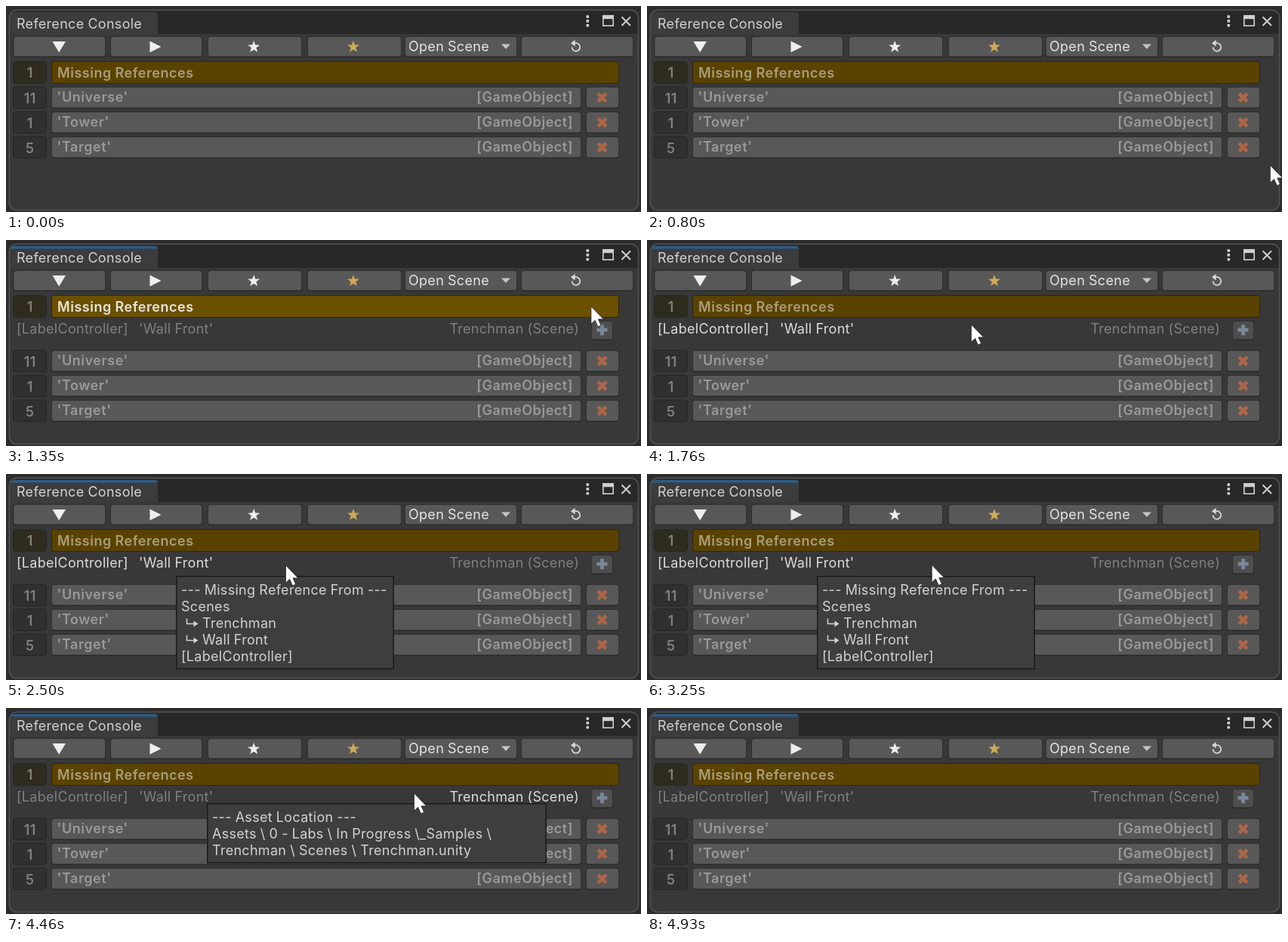
These frames come from a looping animation (841 by 273 pixels, 5600 ms). An HTML page:

```html
<!DOCTYPE html>
<html lang="en">
<head>
<meta charset="utf-8">
<title>Reference Console</title>
<style>
  html, body { margin: 0; width: 100%; height: 100%; overflow: hidden; background: #333; }
  svg { display: block; }
  text { font: 400 18px Inter, "Open Sans", sans-serif; letter-spacing: .29px; word-spacing: -.4px; white-space: pre; }
  .b { font-weight: 600; letter-spacing: .54px; }
</style>
</head>
<body>
<svg id="stage" width="841" height="273" viewBox="0 0 841 273"></svg>
<script>
const LOOP = 5600;
const svg = document.getElementById('stage');

// ---- drawing helpers ----
const text = (x, y, s, fill, extra = '') => `<text x="${x}" y="${y}" fill="${fill}" ${extra}>${s}</text>`;
const rect = (x, y, w, h, fill, extra = '') =>
  `<rect x="${x}" y="${y}" width="${w}" height="${h}" fill="${fill}" ${extra}/>`;
const path = (d, fill, extra = '') => `<path d="${d}" fill="${fill}" ${extra}/>`;
const button = (x, y, w, h, fill = '#585858') =>
  rect(x, y, w, h, '#282828', 'rx="4"') + rect(x, y, w, h - 1.2, '#303030', 'rx="4"') +
  rect(x + 1, y + 1, w - 2, h - 2.4, fill, 'rx="3.2"');
const counter = (y, n, fill, color) =>
  rect(9.5, y + .5, 44, 28.5, fill, 'rx="4" stroke="#252525"') +
  text(31.8, y + 22, n, color, 'class="b" text-anchor="middle"');

function star(cx, cy, r, fill) {
  let d = '';
  for (let i = 0; i < 10; i++) {
    const a = i * Math.PI / 5, q = i % 2 ? r * .4 : r;
    d += (i ? 'L' : 'M') + (cx + q * Math.sin(a)).toFixed(2) + ' ' + (cy - q * Math.cos(a)).toFixed(2);
  }
  return path(d + 'Z', fill);
}

const plus = (cx, cy, r, color, turn = 0) =>
  path(`M${-r} 0H${r}M0 ${-r}V${r}`, 'none',
    `stroke="${color}" stroke-width="4.8" transform="translate(${cx} ${cy}) rotate(${turn})"`);

function row(y, n, name) {
  return counter(y - .4, n, '#303030', '#808080') +
    button(60, y, 702, 29) +
    text(67.6, y + 20, `'${name}'`, '#999', 'class="b"') +
    text(751, y + 20, '[GameObject]', '#999', 'class="b" text-anchor="end"') +
    button(768, y, 44, 29) + plus(789.5, y + 14.2, 7.6, '#ac6648', 45);
}

function toolbar() {
  const spans = [[9.5, 122.5], [138, 122], [267, 125], [399, 125], [528, 149], [682, 149]];
  return spans.map(([x, w]) => button(x, 40, w, 28)).join('') +
    path('M61.5 47H79L70.2 61.5Z', '#eee') +
    path('M190.5 46.5V61.5L205.5 54Z', '#eee') +
    star(328.2, 54.3, 8.4, '#eee') + star(460, 54.3, 8.4, '#d0aa55') +
    text(533, 60, 'Open Scene', '#e4e4e4') +
    path('M656 50.5H668L662 57Z', '#c4c4c4') +
    path('M750.5 49.2H755A5.3 5.3 0 1 1 749.6 54.6', 'none', 'stroke="#d8d8d8" stroke-width="1.8"') +
    path('M748 49.2L753.6 45V53.4Z', '#d8d8d8');
}

function frame() {
  return rect(0, 0, 841, 273, '#2c2c2c') +
    rect(4.5, 5.5, 833, 265, '#383838', 'rx="10"') +
    path('M5 37V15Q5 6 14 6H828Q837 6 837 15V37Z', '#282828') +
    path('M5 38V14Q5 8 11 8H197Q201 8 201 12V38Z', '#3c3c3c') +
    path('M5.5 11.5Q6.5 8 11 8H197Q200.5 8 201 11.5Z', '#2c5d87', 'id="focus"') +
    rect(4.3, 5.3, 833.2, 265.2, 'none', 'rx="10" stroke="#505050" stroke-width="1.7"') +
    text(14, 30, 'Reference Console', '#d2d2d2') +
    [14, 19.8, 25.6].map(y => rect(768.5, y - 1.7, 3.6, 3.6, '#d0d0d0', 'rx=".8"')).join('') +
    rect(790.8, 13, 13.4, 13.2, 'none', 'stroke="#d0d0d0" stroke-width="1.6"') +
    rect(790, 12.2, 15, 5, '#d0d0d0') +
    path('M815.5 14.5L827 26M827 14.5L815.5 26', 'none', 'stroke="#d0d0d0" stroke-width="2"');
}

const elbow = (x, y) =>
  path(`M${x} ${y - 7}V${y}H${x + 10}`, 'none', 'stroke="#d2d2d2" stroke-width="1.5"') +
  path(`M${x + 9} ${y - 4}L${x + 15} ${y}L${x + 9} ${y + 4}Z`, '#d2d2d2');

// Each line is [x, content]; lines sit 22 px apart.
const tip = (id, x, y, w, h, first, lines) =>
  `<g id="${id}">` + rect(x + .75, y + .75, w - 1.5, h - 1.5, '#3e3e3e', 'stroke="#1b1b1b" stroke-width="1.5"') +
  lines.map(([tx, s], i) => text(tx, first + i * 22, s, '#d2d2d2')).join('') + '</g>';

svg.innerHTML = frame() + toolbar() +
  counter(73.4, 1, '#2f2b1d', '#858170') +
  rect(60, 73, 752, 30, '#30270c', 'rx="4"') +
  rect(61, 74, 750, 28, '#5a4300', 'rx="3.2" id="head"') +
  text(68, 95, 'Missing References', '#aa9c78', 'class="b" id="headText"') +
  '<g id="detail">' +
  `<g id="label" fill="#808080"><text x="14" y="124">[LabelController]</text><text x="176" y="124">'Wall Front'</text></g>` +
  text(759, 124, 'Trenchman (Scene)', '#808080', 'id="scene" text-anchor="end"') +
  button(775, 107, 29, 26, '#4e4e4e') + plus(789.5, 119.2, 7, '#7a8799') + '</g>' +
  '<g id="rows">' + row(107, 11, 'Universe') + row(140, 1, 'Tower') + row(173, 5, 'Target') + '</g>' +
  tip('tipFrom', 225, 135, 289, 124, 160,
    [[232, '--- Missing Reference From ---'], [232, 'Scenes'], [260, 'Trenchman'], [260, 'Wall Front'], [232, '[LabelController]']]) +
  '<g id="elbows">' + elbow(239.5, 198.5) + elbow(239.5, 220.5) + '</g>' +
  tip('tipAsset', 266, 126, 450, 80, 151,
    [[273, '--- Asset Location ---'], [273, 'Assets \\ 0 - Labs \\ In Progress \\ <tspan dx="-5">_Samples \\</tspan>'],
     [273, 'Trenchman \\ Scenes \\ Trenchman.unity']]) +
  '<circle id="click" cx="789" cy="88" r="18.5" fill="#979000"/>' +
  path('M0 0V23.2L5.2 18.4L9 27L13.2 25.2L9.5 16.9H16.4Z', '#fff', 'id="cursor" stroke="#222" stroke-width=".8"');

const el = id => document.getElementById(id);
const show = (id, on) => el(id).setAttribute('display', on ? 'inline' : 'none');
const paint = (id, color) => el(id).setAttribute('fill', color);

// Pointer moves: start, last step, step count, from, to, bend of the vertical part.
const moves = [
  [730, 1080, 6, [838, 254], [789, 88], 1],
  [1350, 1900, 9, [789, 88], [377.5, 121], 2.37],
  [1970, 2040, 2, [377.5, 121], [370.5, 121], 1],
  [3250, 3730, 8, [370.5, 121], [527.5, 112], 1],
  [3860, 3860, 1, [527.5, 112], [534, 113], 1],
  [4460, 4460, 1, [534, 113], [540.5, 113], 1],
  [4530, 4860, 6, [540.5, 113], [797, 89], 1]
];

function pointer(t) {
  if (t < 730 || t >= 4930) return null;
  const [t0, t1, n, a, b, bend] = moves.filter(m => m[0] <= t).pop();
  const i = n > 1 ? Math.min(n - 1, Math.floor((t - t0) / (t1 - t0) * (n - 1) + .1)) : 0;
  const u = (i + 1) / n, s = u * u * (3 - 2 * u);
  return [a[0] + (b[0] - a[0]) * s, a[1] + (b[1] - a[1]) * s ** bend];
}

function render(t) {
  const p = pointer(t), open = t >= 1220, pressed = t >= 1150 && t < 1220;
  const [x, y] = p || [-99, -99];
  const onHead = x > 60 && x < 812 && y > 73 && y < 104;
  const onRow = open && y >= 104 && y < 135;

  show('focus', t >= 1150);
  show('click', pressed);
  show('detail', open);
  el('rows').setAttribute('transform', `translate(0 ${open ? 39 : 0})`);
  paint('head', pressed ? '#332500' : onHead ? '#6b5000' : '#5a4300');
  paint('headText', pressed ? '#fff' : onHead ? '#e8e4da' : '#aa9c78');
  paint('label', onRow && x < 475 ? '#dcdcdc' : '#808080');
  paint('scene', onRow && x >= 475 ? '#dcdcdc' : '#808080');

  const from = t >= 2500 && t < 3730;
  show('tipFrom', from);
  show('elbows', from);
  show('tipAsset', t >= 4460 && t < 4600);
  show('cursor', p);
  el('cursor').setAttribute('transform', `translate(${x.toFixed(1)} ${y.toFixed(1)})`);
}

const begin = performance.now();
function tick() {
  render((performance.now() - begin) % LOOP);
  requestAnimationFrame(tick);
}
render(0);
requestAnimationFrame(tick);
</script>
</body>
</html>
```
